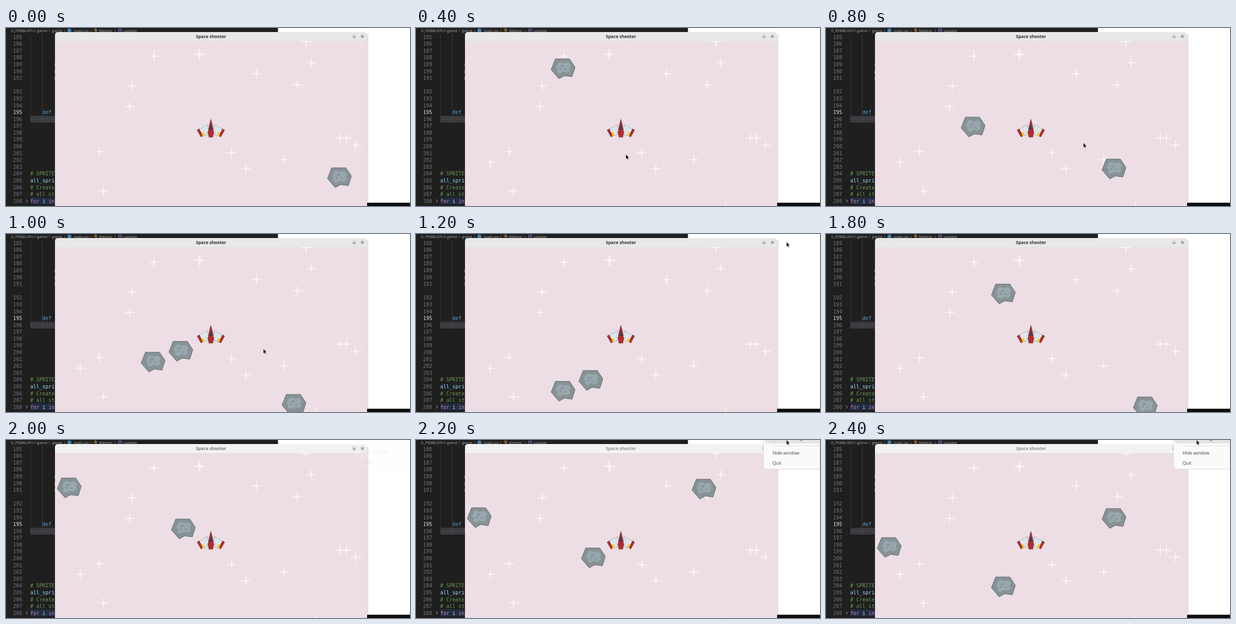
Write an HTML page that moves like this. It is 800x354 px and loops after 2600 ms.

```html
<!DOCTYPE html>
<html lang="en">
<head>
<meta charset="utf-8">
<title>Space shooter</title>
<style>
  html, body { margin: 0; width: 100%; height: 100%; overflow: hidden; background: #fff; }
  svg { display: block; width: 100vw; height: 100vh; }
  .code text { font: 10px "DejaVu Sans Mono", monospace; white-space: pre; }
  .num { fill: #6e7681; text-anchor: end; }
  .crumb { font: 8px "Open Sans", sans-serif; fill: #a5a5a5; }
  .title { font: bold 8.55px "Open Sans", sans-serif; text-anchor: middle; }
  .menu text { font: 8.8px "Open Sans", sans-serif; fill: #3d3d3d; }
</style>
</head>
<body>
<svg viewBox="0 0 800 354" preserveAspectRatio="none">
  <defs>
    <clipPath id="field"><rect x="97" y="26" width="618" height="328"/></clipPath>
    <clipPath id="editor"><rect width="97" height="354"/></clipPath>
    <linearGradient id="shade">
      <stop offset="0" stop-color="#000" stop-opacity=".16"/>
      <stop offset="1" stop-color="#000" stop-opacity="0"/>
    </linearGradient>
    <path id="star" fill="#fcf7fa" d="M0-11 L1.1-1.1 L11 0 L1.1 1.1 L0 11 L-1.1 1.1 L-11 0 L-1.1-1.1Z" stroke="#f8f0f4" stroke-width=".9"/>
    <g id="rock">
      <path d="M9 .5H37L48 17 42 36 27 34 16 40 .5 22Z" fill="#879295" stroke="#5f696d" stroke-linejoin="round"/>
      <path d="M14 8 20 6 25 9 34 7 40 13 37 18 39 24 33 28 25 26 19 30 12 27 14 22 10 18Z" fill="#98a6ad"/>
      <path d="M18 15 23 12 26 14 22 17ZM17 19 20 18 21 22 18 22ZM26 21 31 19 30 23Z" fill="#849196"/>
    </g>
    <g id="wing">
      <path d="M399 192 383 201 388 215 400 212Z" fill="#dce6ea" stroke="#8fa5ad" stroke-width=".8"/>
      <path d="M378.5 203 383 200.5 390.500 214.500 386 216.500Z" fill="#b12e30" stroke="#6d2a2c" stroke-width=".7"/>
      <path d="M384 201 391 214" stroke="#f4f8f9" stroke-width="1.2"/>
      <path d="M387.500 208.500 392 207.500 392.500 215 389 215.500Z" fill="#f2c81c"/>
    </g>
  </defs>

  <path d="M0 0H538.500V20H97V354H0Z" fill="#1f1f1f"/>
  <g id="crumbs"></g>
  <g class="code" id="code" clip-path="url(#editor)"></g>
  <rect x="715" y="347.500" width="85" height="6.500" fill="#0c0c0c"/>
  <rect x="715" y="12" width="4" height="335" fill="url(#shade)"/>

  <path id="bar" d="M97 354V14Q97 8 103 8H709Q715 8 715 14V354Z"/>
  <text class="title" id="title" x="406" y="19.800">Space shooter</text>
  <g fill="#d9d9d9"><circle cx="689.500" cy="16.700" r="5"/><circle cx="705.800" cy="16.700" r="5"/></g>
  <path d="M687.500 18H691.500M704 15 707.600 18.600M707.600 15 704 18.600" stroke="#3c3c3c" fill="none"/>

  <g clip-path="url(#field)">
    <rect x="97" y="26" width="618" height="328" fill="#ecdee4"/>
    <g id="stars"></g>
    <g id="rocks"></g>
    <use href="#wing"/>
    <use href="#wing" transform="translate(811.400 0) scale(-1 1)"/>
    <path d="M405.700 183 397 204 399 215 402 217.500H409.400L412.400 215 414.400 204Z" fill="#eef2f3" stroke="#a9b5ba" stroke-width=".6"/>
    <path d="M405.700 181.500 411 203H400.400Z" fill="#b12e30" stroke="#7a2527" stroke-width=".6"/>
    <path d="M405.700 191 409.300 203H402.100Z" fill="#3b3d5c"/>
    <path d="M402 202H409.400L412 207 409.400 217H402L399.400 207Z" fill="#b12e30" stroke="#7a2527" stroke-width=".6"/>
  </g>

  <g class="menu" id="menu">
    <path d="M688 0V51Q688 58 695 58H800V0Z" fill="#fafafa" stroke="#d2d2d2" stroke-width=".8"/>
    <path d="M691 0Q691 7 697 7H800V0Z" fill="#e3e3e3"/>
    <path d="M706 11.500H800" stroke="#dedede"/>
    <text x="760" y="-.5">g</text>
    <text x="706" y="28.800">Hide window</text>
    <text x="706" y="48.800">Quit</text>
  </g>
  <path id="pointer" d="M0 0V10L2.300 8 3.800 11.300 5.500 10.500 4 7.400H7Z" fill="#111" stroke="#fff" stroke-width=".6"/>
</svg>

<script>
const STEP = 200, COUNT = 13;
const $ = id => document.getElementById(id);

const text = (x, y, s, fill, cls = "") =>
  `<text x="${x}" y="${y}" class="${cls}"${fill ? ` fill="${fill}"` : ""}>${s}</text>`;
const box = (x, y, w, h, fill) =>
  `<rect x="${x}" y="${y}" width="${w}" height="${h}" fill="${fill}"/>`;

// breadcrumb bar
const crumbs = [[10, "0_PEBBLEFLY-game"], [91, "game"], [134, "main.py"], [184, "Meteor"], [233, "update"]];
$("crumbs").innerHTML =
  crumbs.map(([x, s]) => text(x, 8, s, "", "crumb")).join("") +
  [85, 115, 167, 215].map(x => `<path d="M${x} 3l2 2.500-2 2.500" fill="none" stroke="#8a8a8a" stroke-width=".8"/>`).join("") +
  `<circle cx="125.500" cy="5" r="4" fill="#3f7fb0"/>
   <path d="M174 4l3-3 2 2-3 3ZM177 4h4M178 4v4h3" fill="none" stroke="#e39a3c"/>
   <path d="M226 1l3.500 2v4l-3.500 2-3.500-2V3ZM222.500 3l3.500 2 3.500-2M226 5v4" fill="none" stroke="#a884d8" stroke-width=".8"/>`;

// code lines; the wrapped line 191 takes two rows
const rowY = n => 21.600 + (n - 185 + (n > 191 ? 1 : 0)) * 13.590;
const GREEN = "#6a9955", BLUE = "#9cdcfe", PURPLE = "#c586c0";
let code = box(48, 174.500, 49, 13.500, "#393b3e") + box(48, 337, 49, 13.500, "#232d40") +
  box(48, 12, .8, 162, "#3b3b3b") + box(71.500, 12, .8, 176, "#4a4a4a");
for (let n = 185; n <= 208; n++)
  code += n === 195 ? text(32, rowY(n), n, "", "num").replace("<text", '<text style="fill:#e0e0e0"')
                    : text(32, rowY(n), n, "", "num");
for (const n of [189, 190, 191]) code += text(95, rowY(n), "#", GREEN);
code += text(72, rowY(195), "def u", "#569cd6") +
  text(48, rowY(196), "········", "#666a6f") +
  text(48, rowY(204), "# SPRITES", GREEN) +
  text(48, rowY(205), "all_sprites", BLUE) +
  text(48, rowY(206), "# Create", GREEN) +
  text(48, rowY(207), "# all stars", GREEN) +
  text(48, rowY(208), "for", PURPLE) + text(72, rowY(208), "i", BLUE) + text(84, rowY(208), "in", PURPLE) +
  '<path d="M39.500 341l3 3-3 3" fill="none" stroke="#b5b5b5"/>';
$("code").innerHTML = code;

const stars = [[293, 56], [382, 52], [384, 53], [250, 115], [245, 156], [496, 91], [577, 113], [604, 69],
  [594, 27], [662, 219], [674, 219], [692, 233], [447, 248], [475, 280], [550, 262], [185, 246], [193, 324]];
const lateStars = [[147, 267], [613, 356]];
const star = ([x, y]) => `<use href="#star" x="${x}" y="${y}"/>`;
$("stars").innerHTML = stars.map(star).join("") + `<g id="late">${lateStars.map(star).join("")}</g>`;

// x, first step, top there, fall per step, steps alive
const rocks = [
  [636, 0, 277.500, 58, 2],
  [267, 1, 3, 57.900, 7],
  [546, 3, 202, 58.300, 3],
  [322, 5, 213, 58, 3],
  [608, 7, 207, 58.300, 3],
  [327, 8, 41.500, 57.600, 5],
  [101, 10, 75, 59.300, 3],
  [546, 11, 77.500, 58.300, 2]
];
$("rocks").innerHTML = rocks.map(() => '<use href="#rock"/>').join("");
const rockEls = [...$("rocks").children];

// first step, x, y (no place: hidden)
const pointerPath = [[0], [2, 415.500, 251], [4, 509.500, 228], [6, 733.500, 15.500], [7], [11, 733.500, -.5]];

const show = (el, on) => el.setAttribute("visibility", on ? "visible" : "hidden");
const move = (el, x, y) => el.setAttribute("transform", `translate(${x} ${y})`);

function draw(k) {
  rocks.forEach(([x, from, top, fall, life], i) => {
    const age = k - from;
    show(rockEls[i], age >= 0 && age < life);
    move(rockEls[i], x, top + fall * age);
  });
  show($("late"), k > 0);

  const [, px, py] = pointerPath.filter(p => p[0] <= k).pop();
  show($("pointer"), px !== undefined);
  if (px !== undefined) move($("pointer"), px, py);

  const blurred = k >= 10;
  $("bar").setAttribute("fill", blurred ? "#f3f2f2" : "#e9e8e8");
  $("title").setAttribute("fill", k > 10 ? "#929292" : blurred ? "#777" : "#303030");
  $("menu").setAttribute("opacity", k > 10 ? 1 : blurred ? .1 : 0);
  move($("menu"), 0, k > 10 ? 0 : -2.500);
}

let last = -1;
const start = performance.now();
function tick() {
  const k = Math.floor((performance.now() - start) / STEP) % COUNT;
  if (k !== last) draw(last = k);
  requestAnimationFrame(tick);
}
tick();
</script>
</body>
</html>
```
